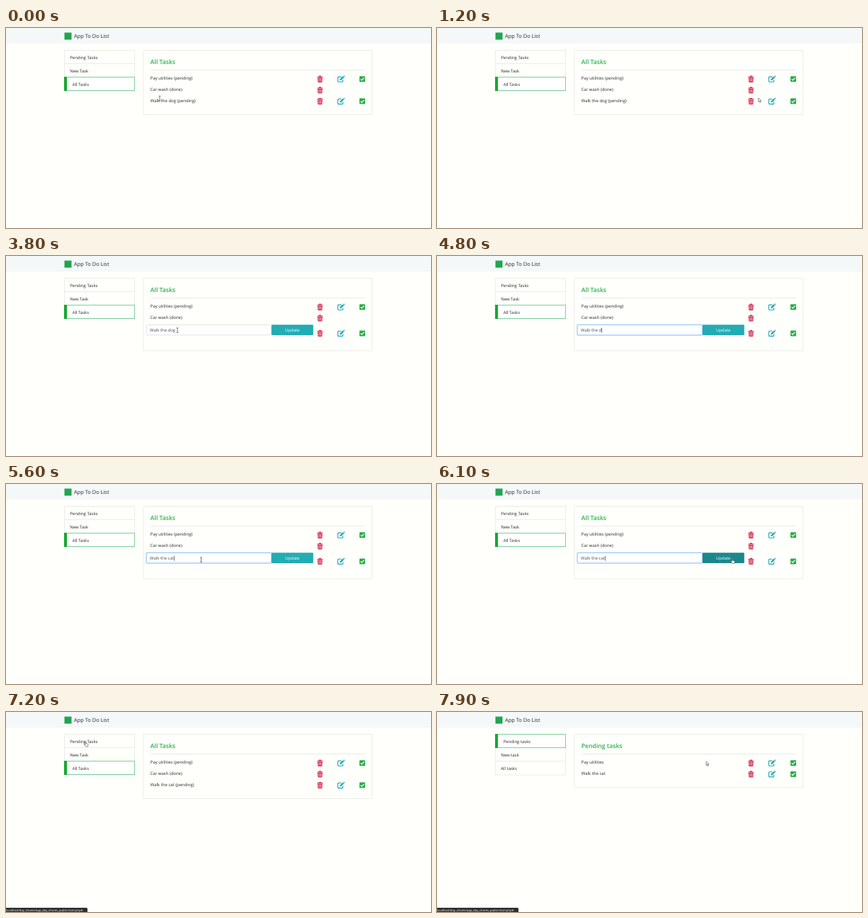
An HTML page that plays this animation: 600 px wide and 283 px high, repeating every 8 s.

```html
<!DOCTYPE html>
<html lang="en">
<head>
<meta charset="utf-8">
<title>App To Do List</title>
<style>
  html, body { margin: 0; width: 100%; height: 100%; overflow: hidden; background: #fffffb; }
  svg { display: block; width: 600px; height: 283px; }
  text {
    font: 5.97px "Open Sans", "Noto Sans", sans-serif;
    fill: #24292e;
    text-rendering: geometricPrecision;
    white-space: pre;
  }
  .brand { font-size: 7.45px; }
  .heading { font-size: 8.65px; font-weight: 600; fill: #28b04c; }
  .value { fill: #495057; }
  .update { fill: #fff; text-anchor: middle; }
  .status { font-size: 4.15px; fill: #fff; }
  .frame { fill: none; stroke: #ebebe8; }
</style>
</head>
<body>
<svg viewBox="0 0 600 283">
  <defs>
    <g id="trash">
      <path d="M-4-3.5h2.1l.6-1.1h2.6l.6 1.1H4v1.1H-4z" fill="#d62f53"/>
      <path d="M-3.5-1.9h7L3.1 3.7q-.1 1-1 1h-4.2q-.9 0-1-1z" fill="#d62f53"/>
      <path d="M-1.7-.8v4.2M0-.8v4.2M1.7-.8v4.2" stroke="#fffffb" stroke-width=".6"/>
    </g>
    <g id="edit" fill="none" stroke="#1ba4b4">
      <path d="M.8-3.1H-3.6q-.7 0-.7.7v5.7q0 .7.7.7h5.7q.7 0 .7-.7V1" stroke-width="1.1"/>
      <path d="M-1.6 1.8l.4-2L2.9-3.9l1.6 1.6L.4 1.5z" fill="#1ba4b4" stroke="none"/>
      <path d="M3.4-4.4l.5-.4q.4-.3.8.1l.7.7q.4.4 0 .8l-.4.4z" fill="#1ba4b4" stroke="none"/>
    </g>
    <g id="check">
      <rect x="-4" y="-4" width="8" height="8" rx=".9" fill="#2bad48"/>
      <path d="M-2.5.1L-.8 1.8 2.6-1.7" fill="none" stroke="#fff" stroke-width="1.2"/>
    </g>
    <path id="arrow" d="M0 0v5.6l1.3-1.2.9 2 .9-.4-.9-1.9h1.8z"
      fill="#fff" stroke="#333" stroke-width=".55"/>
    <path id="beam" d="M-1.4-3.2h1q.4 0 .4.4 0-.4.4-.4h1M0-2.8v5.8M-1.4 3.3h1q.4 0 .4-.4 0 .4.4.4h1"
      fill="none" stroke="#222" stroke-width=".6"/>
    <path id="hand" d="M-.6.5q.6-.9 1.2 0v2.2l2.2.6q.6.2.5.9L3 6.8H-.3L-2.2 4.2q0-.9.9-.6l.7.6z"
      fill="#fff" stroke="#222" stroke-width=".5"/>
  </defs>
  <rect width="600" height="22" fill="#f5f8f8"/>
  <rect x="82.5" y="6.5" width="10" height="10" fill="#20a551"/>
  <text class="brand" x="96" y="14.2">App To Do List</text>
  <g id="page"></g>
  <g id="status">
    <path d="M0 277h113.5q1.5 0 1.5 1.5V283H0z" fill="#2e2e2e"/>
    <text class="status" x="0" y="282.4">localhost/day_chores/app_day_chores_public/start.php#</text>
  </g>
  <use id="cursor"/>
</svg>
<script>
const LOOP = 8000, STEP = 100;
const OPEN = 2300, FOCUS = 3900, HOVER = 6000, SAVED = 6400, PENDING = 7500;
const STATUS_ON = 7000;

// time, x, y, cursor shape ("" hides it)
const PATH = [
  [0, 217, 99.5, "beam"],
  [300, 219, 99.5, "arrow"],
  [900, 440, 97, "arrow"],
  [1200, 453.8, 99, "arrow"],
  [1700, 472, 102, "hand"],
  [2300, 471.5, 103.2, "arrow"],
  [2500, 462.3, 103.5, "arrow"],
  [2700, 262, 106, "beam"],
  [3200, 250, 112, "beam"],
  [3700, 242, 105, "beam"],
  [4500, 242, 105, ""],
  [5500, 242, 107, "beam"],
  [5900, 376, 107, "hand"],
  [6100, 417, 105.5, "hand"],
  [6300, 412, 105, "hand"],
  [6400, 368, 94, "arrow"],
  [7000, 118, 44, "hand"],
  [7300, 110, 41, "hand"],
  [7500, 112, 42, "arrow"],
  [7800, 370, 68, "arrow"],
  [7900, 380, 70, "arrow"],
  [8000, 380, 70, "arrow"]
];

const TYPING = [
  [0, "Walk the dog"], [4600, "Walk the do"], [4700, "Walk the d"],
  [4900, "Walk the "], [5100, "Walk the c"], [5200, "Walk the ca"], [5400, "Walk the cat"]
];

const el = id => document.getElementById(id);
const page = el("page"), status = el("status"), cursor = el("cursor");

const label = (x, y, str, cls = "") => `<text class="${cls}" x="${x}" y="${y}">${str}</text>`;
const icon = (id, x, y) => `<use href="#${id}" x="${x}" y="${y}"/>`;
const lastOf = (table, t) => table.filter(row => row[0] <= t).pop();

function sidebar(names, active) {
  let out = `<path class="frame" d="M82.5 31.5h99v57.5h-99zM82.5 50.5h99M82.5 69.5h99"/>`;
  names.forEach((name, i) => {
    const y = 31.5 + i * 19, on = i === active;
    if (on) out += `<rect x="82.5" y="${y}" width="99" height="19" fill="#fffffd" stroke="#7dcfa0"/>
      <rect x="82" y="${y - .5}" width="4" height="20" fill="#16a830"/>`;
    out += label(on ? 93.7 : 90.2, 44 + i * 19, name);
  });
  return out;
}

function panel(title, bottom) {
  return `<path class="frame" d="M194 31.5h322.5V${bottom}H194z"/>
    <path class="frame" d="M204 59.5h303"/>` + label(203.8, 51.3, title, "heading");
}

function icons(y, done) {
  return icon("trash", 443.3, y) + (done ? "" : icon("edit", 472.8, y) + icon("check", 503, y));
}

function task(i, str, done) {
  return label(203.8, 73.3 + i * 15.7, str) + icons(72.2 + i * 15.7, done);
}

function editor(value, focused, hover) {
  const glow = focused
    ? `<rect x="197.3" y="96.4" width="178.4" height="16.4" rx="1.8" fill="#bfdcfb"/>` : "";
  return `${glow}<rect x="198.3" y="97.4" width="176.4" height="14.4" rx="1.2" fill="#fff"
      stroke="${focused ? "#80bdff" : "#d5dadd"}" stroke-width=".7"/>
    <rect x="374.8" y="97.2" width="59" height="14.8" rx="1.2" fill="${hover ? "#1b878c" : "#22acb4"}"/>`
    + label(203, 107.3, value, "value") + label(404.2, 107.1, "Update", "update")
    + (focused ? `<rect id="caret" y="101.6" width=".6" height="7" fill="#222"/>` : "")
    + icons(109.4, false);
}

function scene(t) {
  if (t >= PENDING) {
    return sidebar(["Pending tasks", "New task", "All tasks"], 0)
      + panel("Pending tasks", 107) + task(0, "Pay utilities") + task(1, "Walk the cat");
  }
  const editing = t >= OPEN && t < SAVED;
  const pet = t < OPEN ? "dog" : "cat";
  return sidebar(["Pending Tasks", "New Task", "All Tasks"], 2)
    + panel("All Tasks", editing ? 134 : 122.5)
    + task(0, "Pay utilities (pending)") + task(1, "Car wash (done)", true)
    + (editing
      ? editor(lastOf(TYPING, t)[1], t >= FOCUS, t >= HOVER)
      : task(2, `Walk the ${pet} (pending)`));
}

function placeCaret() {
  const caret = el("caret");
  if (!caret) return;
  const width = page.querySelector(".value").getComputedTextLength();
  caret.setAttribute("x", 203.2 + width);
}

function placeCursor(t) {
  const a = lastOf(PATH, t), b = PATH[PATH.indexOf(a) + 1];
  const k = (t - a[0]) / (b[0] - a[0]);
  const mix = i => a[i] + (b[i] - a[i]) * k;
  cursor.setAttribute("href", "#" + a[3]);
  cursor.setAttribute("transform", `translate(${mix(1)} ${mix(2)})`);
  cursor.style.display = a[3] ? "" : "none";
}

let shown = -1;
function draw() {
  const t = Math.floor(performance.now() % LOOP / STEP) * STEP;
  if (t !== shown) {
    shown = t;
    page.innerHTML = scene(t);
    placeCaret();
    placeCursor(t);
    status.style.display = t >= STATUS_ON ? "" : "none";
  }
  requestAnimationFrame(draw);
}
draw();
</script>
</body>
</html>
```
